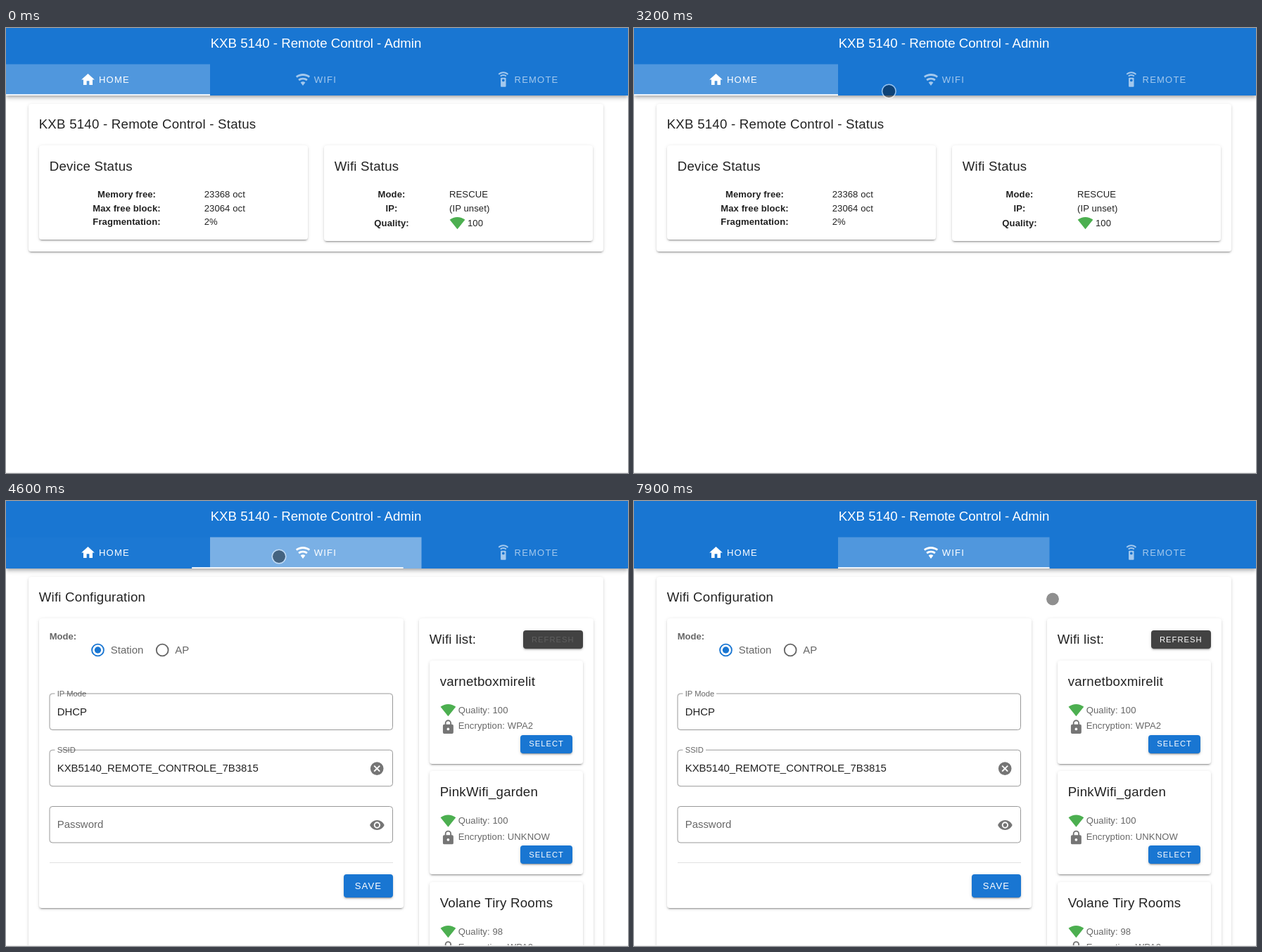
Animation of 884 by 633 pixels, one loop 8 s. Source, as an HTML page:

```html
<!DOCTYPE html>
<html lang="en">
<head>
<meta charset="utf-8">
<title>Remote control admin</title>
<style>
html, body { margin: 0; width: 100%; height: 100%; overflow: hidden; background: #fff; }
#stage { position: relative; width: 884px; height: 633px; overflow: hidden; }
#stage div, svg { position: absolute; }
svg { left: 0; top: 0; }
.page { left: 0; top: 0; width: 884px; height: 632px; overflow: hidden; }
.card { background: #fff; border-radius: 4px;
  box-shadow: 0 3px 1px -2px #0003, 0 2px 2px #00000024, 0 1px 5px #0000001f; }
.bar { left: 0; top: 0; width: 884px; height: 96px; background: #1976d2;
  box-shadow: 0 2px 4px -1px #0003, 0 4px 5px #00000024, 0 1px 10px #0000001f; }
.foot { left: 0; top: 632px; width: 884px; height: 1px; background: #eee; }
text { font: 13.07px "Liberation Sans", Arial, sans-serif; fill: #000000de; white-space: pre; }
.title { font-size: 18.67px; letter-spacing: .233px; }
.app { font-size: 18.67px; fill: #fff; text-anchor: middle; }
.tab, .save { letter-spacing: 1.167px; fill: #fff; }
.small { font-size: 11.2px; letter-spacing: 1px; fill: #fff; }
.cell, .info { letter-spacing: .093px; }
.head { letter-spacing: .093px; font-weight: bold; text-anchor: middle; }
.mode { font-weight: bold; }
.input, .hint { font-size: 14.93px; }
.label { font-size: 11.2px; }
.info, .mode, .hint, .label { fill: #0009; }
</style>
</head>
<body>
<div id="stage"></div>
<script>
const ICONS = {
  home: 'M10,20V14H14V20H19V12H22L12,3L2,12H5V20H10Z',
  wifi: 'M12,21L15.6,16.2C14.6,15.45 13.35,15 12,15C10.65,15 9.4,15.45 8.4,16.2ZM12,3C7.95,3 4.21,4.34 1.2,6.6L3,9C5.5,7.12 8.62,6 12,6C15.38,6 18.5,7.12 21,9L22.8,6.6C19.79,4.34 16.05,3 12,3M12,9C9.3,9 6.81,9.89 4.8,11.4L6.6,13.8C8.1,12.67 9.97,12 12,12C14.03,12 15.9,12.67 17.4,13.8L19.2,11.4C17.19,9.89 14.7,9 12,9Z',
  remote: 'M12,0C8.96,0 6.21,1.23 4.22,3.22L5.63,4.63C7.26,3 9.5,2 12,2S16.74,3 18.36,4.64L19.77,3.23C17.79,1.23 15.04,0 12,0M7.05,6.05L8.46,7.46C9.37,6.56 10.62,6 12,6S14.63,6.56 15.54,7.46L16.95,6.05C15.68,4.78 13.93,4 12,4S8.32,4.78 7.05,6.05M12,15A2,2 0 0,1 12,11A2,2 0 0,1 12,15M15,9H9A1,1 0 0,0 8,10V22A1,1 0 0,0 9,23H15A1,1 0 0,0 16,22V10A1,1 0 0,0 15,9Z',
  signal: 'M12,3C7.79,3 3.7,4.41 .38,7L12,21.5L23.65,7C20.32,4.41 16.22,3 12,3Z',
  lock: 'M12,17A2,2 0 0,0 12,13A2,2 0 0,0 12,17M18,8A2,2 0 0,1 20,10V20A2,2 0 0,1 18,22H6A2,2 0 0,1 4,20V10A2,2 0 0,1 6,8H7V6A5,5 0 0,1 17,6V8H18M12,3A3,3 0 0,0 9,6V8H15V6A3,3 0 0,0 12,3Z',
  clear: 'M12,2A10,10 0 0,1 12,22A10,10 0 0,1 12,2M15.59,7L12,10.59L8.41,7L7,8.41L10.59,12L7,15.59L8.41,17L12,13.41L15.59,17L17,15.59L13.41,12L17,8.41Z',
  eye: 'M12,9A3,3 0 0,0 12,15A3,3 0 0,0 12,9M12,17A5,5 0 0,1 12,7A5,5 0 0,1 12,17M12,4.5C7,4.5 2.73,7.61 1,12C2.73,16.39 7,19.5 12,19.5S21.27,16.39 23,12C21.27,7.61 17,4.5 12,4.5Z'
};

const text = (x, y, cls, str, id = '') => `<text x="${x}" y="${y}" class="${cls}" id="${id}">${str}</text>`;
const icon = (x, y, name, color) =>
  `<path transform="translate(${x} ${y}) scale(.9333)" d="${ICONS[name]}" fill="${color}" fill-rule="evenodd"/>`;
const card = (x, y, w, h, color = '#fff') =>
  `<div class="card" style="left:${x}px;top:${y}px;width:${w}px;height:${h}px;background:${color}"></div>`;
const svg = body => `<svg width="884" height="633">${body}</svg>`;
const page = (id, cards, body) => `<div class="page" id="${id}">${cards}${svg(body)}</div>`;
const row = (cx, x, y, name, value) => text(cx, y, 'head', name) + text(x, y, 'cell', value);
const rect = (x, y, w, h, attrs) => `<rect x="${x}" y="${y}" width="${w}" height="${h}" ${attrs}/>`;

const GREEN = '#4caf50', GREY = '#757575', BLUE = '#1976d2';
const DEVICE = 'KXB 5140 - Remote Control';

const home = page('home',
  card(32, 108, 817, 210) + card(47, 167, 382, 133.5) + card(452, 167, 382, 136),
  text(46.7, 143, 'title', DEVICE + ' - Status') +
  text(61.7, 203, 'title', 'Device Status') +
  row(171.5, 281.7, 241, 'Memory free:', '23368 oct') +
  row(171.5, 281.7, 260.7, 'Max free block:', '23064 oct') +
  row(171.5, 281.7, 280.2, 'Fragmentation:', '2%') +
  text(466.7, 203, 'title', 'Wifi Status') +
  row(548, 630, 241, 'Mode:', 'RESCUE') +
  row(548, 630, 260.7, 'IP:', '(IP unset)') +
  row(548, 656, 281.7, 'Quality:', '100') +
  icon(630.3, 266.2, 'signal', GREEN));

const networks = [
  ['varnetboxmirelit', 100, 'WPA2'],
  ['PinkWifi_garden', 100, 'UNKNOW'],
  ['Volane Tiry Rooms', 98, 'WPA2']
];
const netY = i => 227 + i * 157.4;

const field = (y, label, gap) =>
  rect(62, y, 487.5, 51.5, 'rx="4" fill="none" stroke="#999"') +
  (label ? rect(69.5, y - 2, gap, 4, `fill="#fff" class="gap" data-w="${gap}"`) +
    text(72.7, y + 4, 'label', label) : '');

const network = ([name, quality, lock], i) => {
  const y = netY(i);
  return text(616.7, y + 36, 'title', name) +
    icon(617.2, y + 59.3, 'signal', GREEN) + text(642.7, y + 74.7, 'info', 'Quality: ' + quality) +
    icon(617.2, y + 83.4, 'lock', GREY) + text(642.7, y + 97.3, 'info', 'Encryption: ' + lock) +
    text(743.3, y + 122.3, 'small', 'SELECT');
};

const wifi = page('wifi',
  card(32, 108, 817, 600) + card(47, 167, 518, 411.5) + card(587, 167, 247.5, 600) +
  card(480, 530.5, 70, 33.5, BLUE) + card(735, 184, 84.5, 26, '#424242') +
  networks.map((n, i) => card(602, netY(i), 217.5, 146.5) + card(731, netY(i) + 105.5, 73.5, 26, BLUE)).join(''),
  text(46.7, 143, 'title', 'Wifi Configuration') +
  text(61.7, 197, 'mode', 'Mode:') +
  `<g fill="none" stroke-width="1.87"><circle cx="130.5" cy="212" r="8.4" stroke="${BLUE}"/>
   <circle cx="222.2" cy="212" r="8.4" stroke="#666"/></g><circle cx="130.5" cy="212" r="4.67" fill="${BLUE}"/>` +
  text(148.8, 217, 'hint', 'Station') + text(240.3, 217, 'hint', 'AP') +
  field(274, 'IP Mode', 47.5) + text(72.7, 304.5, 'input', 'DHCP') +
  field(354.2, 'SSID', 32.5) + text(72.7, 384.8, 'input', 'KXB5140_REMOTE_CONTROLE_7B3815') +
  field(434.5) + text(72.7, 465, 'hint', 'Password') +
  icon(516, 369.4, 'clear', GREY) + icon(516.2, 449.8, 'eye', GREY) +
  rect(62, 514, 488, 1, 'fill="#0000001f"') +
  text(495.7, 552, 'save', 'SAVE') +
  text(601.7, 203, 'title', 'Wifi list:') + text(747, 201, 'small', 'REFRESH', 'refresh') +
  networks.map(network).join(''));

const header = '<div class="bar"></div>' + svg(
  '<clipPath id="tabClip"><path d="M290 51.5H590.5V96H290Z"/></clipPath>' +
  rect(0, 51.5, 290, 44.5, 'fill="#fff" id="homeGlow"') +
  rect(290, 51.5, 300.5, 44.5, 'fill="#fff" id="wifiGlow"') +
  '<circle id="ripple" cx="388" cy="79" fill="#fff" clip-path="url(#tabClip)"/>' +
  rect(0, 94.2, 290, 1.8, 'fill="#fff" id="slider"') +
  text(440.5, 28, 'app', DEVICE + ' - Admin') +
  icon(105.3, 62.3, 'home', '#fff') + text(132, 78.3, 'tab', 'HOME') +
  `<g id="wifiTab">${icon(410.8, 62.3, 'wifi', '#fff') + text(437.7, 78.3, 'tab', 'WIFI')}</g>` +
  `<g opacity=".6">${icon(695.6, 62.3, 'remote', '#fff') + text(722.6, 78.3, 'tab', 'REMOTE')}</g>`);

const cursor = svg('<g id="cursor"><circle r="9" fill="#000" fill-opacity=".44"/>' +
  '<circle r="9.8" fill="none" stroke="#fff" stroke-opacity=".55" stroke-width="1.5"/></g>');

const $ = id => document.getElementById(id);
$('stage').innerHTML = home + wifi + '<div class="foot"></div>' + header + cursor;

// Pointer path: time, x, y
const PATH = [
  [300, 5, 37], [400, 5, 37], [700, 108, 60], [900, 168, 75], [1000, 169.5, 74], [1300, 169.5, 73.5],
  [1400, 170.5, 73.5], [2300, 170.5, 73.5], [2400, 171.5, 74], [2500, 171.5, 74],
  [2600, 217, 158], [2700, 217, 158], [3000, 305, 112], [3300, 391, 79], [3500, 388, 79],
  [5100, 388, 79], [5400, 387, 92], [5800, 387, 92], [6200, 396, 125], [6700, 396, 125],
  [7100, 503.5, 149.5], [7600, 584, 141], [7900, 595, 139.5], [8000, 595, 139.5]
];
const clamp = v => Math.max(0, Math.min(1, v));
const ramp = (t, from, to) => clamp((t - from) / (to - from));
const set = (id, attrs) => { for (const k in attrs) $(id).setAttribute(k, attrs[k]); };

function pointer(t) {
  const i = Math.max(1, PATH.findIndex(p => p[0] >= t));
  const [a, b] = [PATH[i - 1], PATH[i]];
  const p = ramp(t, a[0], b[0]);
  return [a[1] + (b[1] - a[1]) * p, a[2] + (b[2] - a[2]) * p];
}

function draw(t) {
  const open = t >= 4500;
  $('home').style.display = open ? 'none' : '';
  $('wifi').style.display = open ? '' : 'none';

  set('cursor', { transform: `translate(${pointer(t)})`, opacity: t < 300 ? 0 : 1 });

  const slide = 1 - (1 - ramp(t, 4434, 4734)) ** 3;
  set('slider', { x: 290 * slide, width: open ? 300.5 : 290 });
  set('homeGlow', { opacity: .24 * (1 - ramp(t, 4400, 4610)) });
  set('wifiGlow', { opacity: .24 * ramp(t, 4400, 4600) });
  set('wifiTab', { opacity: .6 + .4 * ramp(t, 4400, 4600) });
  set('ripple', {
    r: 44 + 180 * ramp(t, 4400, 4600),
    opacity: t < 4400 ? 0 : (.02 + .22 * ramp(t, 4400, 4600)) * (1 - ramp(t, 4600, 4900))
  });
  set('refresh', { opacity: .15 + .85 * ramp(t, 4600, 4800) });
  const gap = ramp(t, 4550, 4750);
  document.querySelectorAll('.gap').forEach(g => g.setAttribute('width', g.dataset.w * gap));
}

function tick() {
  draw(Math.floor(performance.now() % 8000 / 100) * 100);
  requestAnimationFrame(tick);
}
tick();
</script>
</body>
</html>
```
